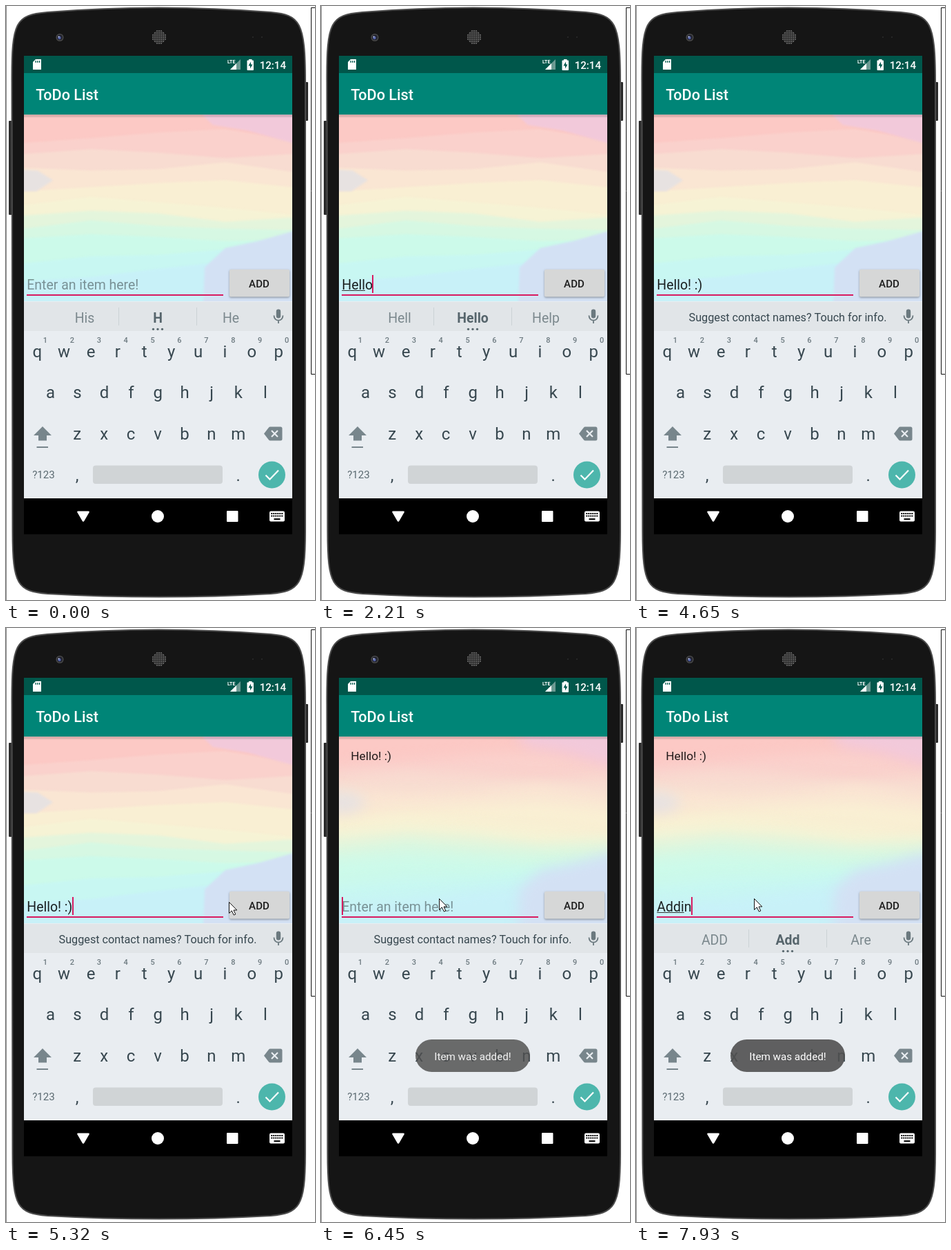
An HTML page with a canvas that plays this animation: 448 px wide and 859 px high, repeating every 8000 ms.

```html
<!DOCTYPE html>
<html lang="en">
<head>
<meta charset="utf-8">
<title>ToDo List</title>
<style>
html, body { margin: 0; width: 100%; height: 100%; overflow: hidden; background: #fff; }
canvas { display: block; width: 448px; height: 859px; }
</style>
</head>
<body>
<canvas id="stage" width="448" height="859"></canvas>
<script>
const W = 448, H = 859, LOOP = 8000;
const DP = 389 / 360;
const ACCENT = '#d81b60', KEY = '#37474f', ICON = '#78868c', KEYS_BG = '#e9edf1';
const HINT = 'Enter an item here!';
const stage = document.getElementById('stage').getContext('2d');

// start, typed text, composing length, caret shown, suggestions
const typing = [
  [0, '', 0, 0, 'start'],
  [280, '', 0, 1, 'start'],
  [840, '', 0, 0, 'start'],
  [1110, 'H', 0, 1, 'start'],
  [1490, 'He', 0, 1, 'start'],
  [1640, 'He', 2, 1, 'start'],
  [1780, 'Hel', 2, 1, 'hel'],
  [1920, 'Hell', 3, 1, 'hel'],
  [2050, 'Hell', 4, 1, 'hel'],
  [2190, 'Hello', 4, 1, 'hello'],
  [2330, 'Hello', 5, 1, 'hello'],
  [2890, 'Hello!', 5, 1, 'hello'],
  [3040, 'Hello!', 0, 1, 'hello'],
  [3350, 'Hello! ', 0, 1, 'tip'],
  [3820, 'Hello! :', 0, 1, 'tip'],
  [4120, 'Hello! :)', 0, 1, 'tip'],
  [4650, 'Hello! :)', 0, 0, 'tip'],
  [5180, 'Hello! :)', 0, 1, 'tip'],
  [5600, 'Hello! :)', 0, 0, 'tip'],
  [6150, '', 0, 1, 'tip'],
  [6570, '', 0, 0, 'tip'],
  [7120, 'A', 0, 1, 'tip'],
  [7260, 'A', 1, 1, 'tip'],
  [7390, 'Ad', 1, 1, 'add'],
  [7530, 'Add', 2, 1, 'add'],
  [7660, 'Add', 3, 1, 'add'],
  [7800, 'Addi', 3, 1, 'add'],
  [7930, 'Addin', 4, 1, 'add']
];
const words = {
  start: ['His', 'H', 'He'],
  hel: ['Her', 'Hel', 'Hello'],
  hello: ['Hell', 'Hello', 'Help'],
  add: ['ADD', 'Add', 'Are']
};
const pointer = [[5050, 318, 308], [5180, 322, 360], [5320, 323, 396], [5600, 324, 396],
  [6300, 250, 394], [6450, 171, 391]];
const toast = [[0, 0], [6150, .13], [6300, .55], [6450, .92], [6570, 1]];
const press = [[0, 0], [5880, .04], [6020, .09], [6150, .06], [6300, .03], [6450, 0]];

const at = (steps, t) => steps.filter(s => s[0] <= t).pop();

function layer(draw) {
  const c = document.createElement('canvas');
  c.width = W;
  c.height = H;
  draw(c.getContext('2d'));
  return c;
}

function rect(c, x, y, w, h, color, r = 0) {
  c.fillStyle = color;
  c.beginPath();
  c.roundRect(x, y, w, h, r);
  c.fill();
}

function disc(c, x, y, r, color) {
  c.fillStyle = color;
  c.beginPath();
  c.arc(x, y, r, 0, 7);
  c.fill();
}

function shape(c, d, color, line = 0) {
  const p = new Path2D(d);
  if (line) {
    c.strokeStyle = color;
    c.lineWidth = line;
    c.stroke(p);
  } else {
    c.fillStyle = color;
    c.fill(p);
  }
}

function text(c, s, x, y, size, color, align = 'left', weight = 400) {
  c.font = `${weight} ${size}px Roboto, sans-serif`;
  c.textAlign = align;
  c.fillStyle = color;
  c.fillText(s, x, y);
}

// Each band: colour and heights of its upper edge at five even places.
const bands = [
  ['#fcc9c5', 120, 120, 120, 120, 120],
  ['#fad1cc', 198, 191, 183, 178, 194],
  ['#f8dcd1', 214, 207, 212, 220, 214],
  ['#fae6d3', 234, 238, 236, 226, 240],
  ['#f9efd3', 268, 262, 256, 252, 262],
  ['#f6f3d5', 288, 276, 284, 292, 302],
  ['#e4f5dc', 303, 296, 300, 312, 306],
  ['#d6f8e3', 322, 310, 318, 322, 324],
  ['#ccfaea', 336, 330, 334, 340, 338],
  ['#c8f7f2', 372, 362, 360, 352, 348],
  ['#c8f1f8', 398, 392, 380, 370, 366]
];

const wallpaper = blur => layer(c => {
  c.beginPath();
  c.rect(26, 157, 389, 270);
  c.clip();
  c.filter = `blur(${blur}px)`;
  for (const [color, ...ys] of bands) {
    c.fillStyle = color;
    c.beginPath();
    c.moveTo(-60, 500);
    c.lineTo(-60, ys[0]);
    ys.forEach((y, i) => c.lineTo(26 + i * 97.25, y));
    c.lineTo(500, ys[4]);
    c.lineTo(500, 500);
    c.fill();
  }
  shape(c, 'M285 120L285 158L300 172L350 180L415 198L480 205V120Z', '#f2c9da');
  shape(c, 'M10 236L46 238L68 252L44 268L10 268Z', '#e7e2e1');
  shape(c, 'M285 460L288 378L318 350L365 340L415 326L480 326V460Z', '#d3e1f4');
});
const banded = wallpaper(1.5), smooth = wallpaper(9);

function drawPhone(c) {
  c.fillStyle = '#fff';
  c.fillRect(0, 0, W, H);
  rect(c, 0, 0, 1, H, '#8c8c8c');
  shape(c, 'M460 2.5H442.5V532.5H460', '#111', 1);
  rect(c, 4, 166, 6, 136, '#2b2b2b', 1);
  rect(c, 432, 110, 6, 56, '#2b2b2b', 1);
  const body = 'M8.5 110C8 22 14 13 60 9Q220 -4 384 9C426 13 434 22 434 110V760' +
    'C434 838 425 846 384 850Q222 859 60 850C17 846 9.5 838 9.5 760Z';
  shape(c, body, '#151515');
  shape(c, body, '#4c4c4c', 2);
  disc(c, 78, 45.5, 5.5, '#4a4a4a');
  disc(c, 78, 45.5, 4, '#22232e');
  disc(c, 77.5, 46, 2.2, '#5463a8');
  disc(c, 76.5, 44.5, 1, '#ccd3ee');
  disc(c, 222, 45, 10, '#292929');
  for (let y = -9; y <= 9; y += 3)
    for (let x = -9; x <= 9; x += 3)
      if (x * x + y * y < 95) disc(c, 222 + x, 45 + y, .95, '#747474');
  disc(c, 358, 45, 1, '#2c2c2c');
  disc(c, 371, 45, 1, '#2c2c2c');
}

function drawBars(c) {
  rect(c, 26, 72, 389, 25.5, '#00574b');
  rect(c, 26, 97, 389, 61, '#008577');
  text(c, 'ToDo List', 26 + 16 * DP, 136, 20 * DP, '#fff', 'left', 500);
  shape(c, 'M43 77H51V92H39V81Z', '#fff');
  for (const x of [42.5, 45.2, 47.9]) rect(c, x, 79, 1.3, 3, '#00574b');
  shape(c, 'M340 77V92H325Z', '#6c9a93');
  shape(c, 'M334 83V92H325Z', '#fff');
  text(c, 'LTE', 321, 83, 7, '#fff', 'left', 700);
  rect(c, 349.5, 78.5, 9.5, 14.5, '#fff', 1);
  rect(c, 352, 77, 4.5, 2, '#fff');
  shape(c, 'M355 80.5L351.5 86.5H354V90.5L357.5 84.5H355Z', '#00574b');
  text(c, '12:14', 406, 90.5, 14 * DP, '#fff', 'right', 500);

  rect(c, 26, 712, 389, 52, '#000');
  shape(c, 'M104.5 730.5H119.5Q121.5 730.5 120.5 732.5L113.5 744.5Q112 747 110.5 744.5L103.5 732.5Q102.5 730.5 104.5 730.5Z', '#fff');
  disc(c, 220, 738, 9, '#fff');
  rect(c, 320, 730, 16.5, 16, '#fff', 1);
  rect(c, 382, 730.5, 22, 15, '#fff', 2);
  for (let i = 0; i < 6; i++) {
    rect(c, 384.3 + i * 3, 733, 2, 2, '#000');
    rect(c, 384.3 + i * 3, 736.5, 2, 2, '#000');
  }
  rect(c, 388.5, 741, 9, 2, '#000');
}

function drawKeys(c) {
  rect(c, 26, 427, 389, 285, KEYS_BG);
  rect(c, 26, 428, 389, 42, '#e1e5e8');
  rect(c, 391.8, 438.5, 6.4, 13, '#6b797f', 3.2);
  shape(c, 'M388.5 447.5C388.5 457 401.5 457 401.5 447.5M395 454.5V459', '#6b797f', 1.8);

  const step = 38.9;
  const row = (s, x, y) => [...s].forEach((k, i) => text(c, k, x + i * step, y, 24, KEY, 'center'));
  row('qwertyuiop', 45.2, 508);
  row('asdfghjkl', 64.6, 567);
  row('zxcvbnm', 103.3, 627);
  [...'1234567890'].forEach((k, i) => text(c, k, 57 + i * step, 487, 11, '#6d7a80', 'center', 500));
  text(c, '?123', 54.5, 683, 14 * DP, '#5b6a71', 'center');
  text(c, ',', 103, 687, 24, KEY, 'center');
  text(c, '.', 336.7, 687, 24, KEY, 'center');
  shape(c, 'M53 608L66 621H59V628.5H47V621H40Z', ICON);
  rect(c, 44.5, 637, 16.5, 2, ICON);
  shape(c, 'M374 618.5L381 609.5Q381.8 608.5 383 608.5H398Q400.5 608.5 400.5 611V626Q400.5 628.5 398 628.5H383Q381.8 628.5 381 627.5Z', ICON);
  shape(c, 'M385 614L394 623M394 614L385 623', KEYS_BG, 2.2);
  rect(c, 126, 664.5, 188, 26.5, '#d0d4d6', 4);
  disc(c, 385.5, 678, 19.5, '#4db6ac');
  shape(c, 'M376.5 678.5L382.5 684.5L395 671.5', '#fff', 2.2);
}

const base = layer(c => {
  drawPhone(c);
  drawBars(c);
  drawKeys(c);
});

function drawBar(c, mode) {
  if (mode === 'tip') {
    text(c, 'Suggest contact names? Touch for info.', 220, 456, 15 * DP, KEY, 'center');
    return;
  }
  rect(c, 163, 436, 1, 26, '#cbd2d5');
  rect(c, 276, 436, 1, 26, '#cbd2d5');
  words[mode].forEach((s, i) => {
    const mid = i === 1;
    text(c, s, 114 + i * 106, 457.5, 18 * DP, mid ? '#56656c' : '#7b888d', 'center', mid ? 700 : 400);
  });
  for (const x of [213.5, 220, 226.5]) disc(c, x, 467.3, 1.6, '#56656c');
}

function drawField(c, s, composed, caret) {
  const x = 26 + 4 * DP, y = 409.5, size = 18 * DP;
  text(c, s || HINT, x, y, size, s ? 'rgba(0,0,0,.87)' : 'rgba(0,0,0,.4)');
  const end = x + (s ? c.measureText(s).width : 0);
  if (composed) rect(c, x, 411, c.measureText(s.slice(0, composed)).width, 1, '#333');
  rect(c, 30, 417, 285, 2, ACCENT);
  if (caret) rect(c, Math.round(end - .6), 389, 2, 26, ACCENT);
}

function drawButton(c, dark) {
  c.save();
  c.shadowColor = 'rgba(0,0,0,.35)';
  c.shadowBlur = dark ? 5 : 3;
  c.shadowOffsetY = 1.2;
  rect(c, 324, 381, 87, 39.5, '#d6d7d7', 2);
  c.restore();
  if (dark) rect(c, 324, 381, 87, 39.5, `rgba(0,0,0,${dark})`, 2);
  text(c, 'ADD', 367, 406.5, 14 * DP, 'rgba(0,0,0,.87)', 'center', 500);
}

function drawToast(c, alpha) {
  if (!alpha) return;
  c.globalAlpha = alpha;
  rect(c, 137, 595, 166, 47, 'rgba(80,80,80,.9)', 23.5);
  text(c, 'Item was added!', 220, 625, 15.2, '#fff', 'center');
  c.globalAlpha = 1;
}

function drawPointer(c, pos) {
  if (!pos) return;
  c.save();
  c.translate(pos[1] + .5, pos[2] + .5);
  const arrow = 'M0 0V16L3.8 12.4L6.8 18.6L9.3 17.5L6.5 11.5H11.3Z';
  shape(c, arrow, '#fff');
  shape(c, arrow, '#111', 1);
  c.restore();
}

function draw(t) {
  const c = stage, added = t >= 6300;
  const [, s, composed, caret, mode] = at(typing, t);
  c.drawImage(base, 0, 0);
  c.drawImage(added ? smooth : banded, 0, 0);
  const shade = c.createLinearGradient(0, 157, 0, 162);
  shade.addColorStop(0, 'rgba(0,0,0,.25)');
  shade.addColorStop(1, 'rgba(0,0,0,0)');
  rect(c, 26, 157.5, 389, 5, shade);
  if (added) text(c, 'Hello! :)', 26 + 16 * DP, 190.5, 16 * DP, 'rgba(0,0,0,.87)');
  drawField(c, s, composed, caret);
  drawButton(c, at(press, t)[1]);
  drawBar(c, mode);
  drawToast(c, at(toast, t)[1]);
  drawPointer(c, at(pointer, t));
}

const began = performance.now();
function tick() {
  draw((performance.now() - began) % LOOP);
  requestAnimationFrame(tick);
}
tick();
</script>
</body>
</html>
```
